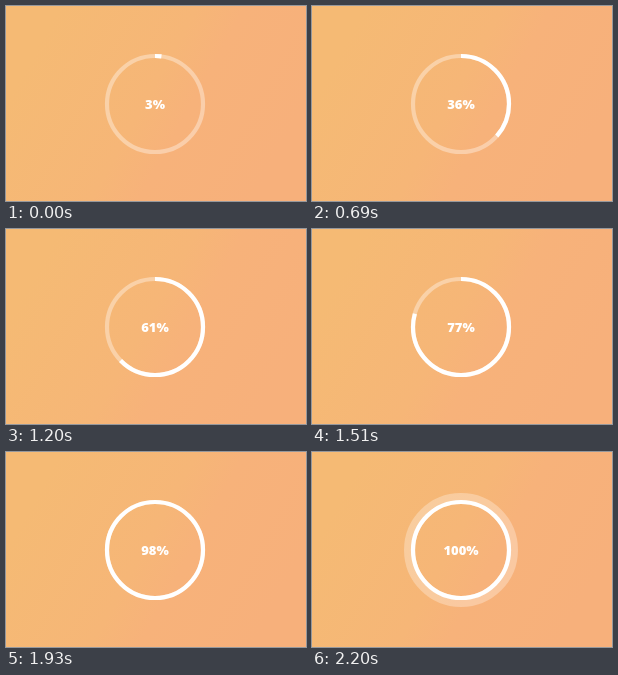
Animation, 300 px wide and 195 px high, one loop 2300 ms. Source, as an HTML page with a canvas:

```html
<!DOCTYPE html>
<html lang="en">
<head>
<meta charset="utf-8">
<title>Progress ring</title>
<style>
  html, body { margin: 0; width: 100%; height: 100%; overflow: hidden; }
  canvas { display: block; width: 300px; height: 195px; }
</style>
</head>
<body>
<canvas id="stage" width="300" height="195"></canvas>
<script>
const ctx = document.getElementById('stage').getContext('2d');
const LOOP = 2300;
const TICKS = [0, 140, 270, 410, 540, 690, 840, 960, 1080, 1200,
               1350, 1510, 1660, 1780, 1930, 2080, 2200];
const CX = 149, CY = 98, RADIUS = 48, WIDTH = 4.2;
const TOP = -Math.PI / 2, TURN = Math.PI * 2;

const background = ctx.createLinearGradient(35, 34, 265, 161);
background.addColorStop(0, '#f5ba74');
background.addColorStop(0.46, '#f6b677');
background.addColorStop(0.62, '#f7b27a');
background.addColorStop(1, '#f7b07b');

function percentAt(t) {
  const value = t < 1200 ? 2.5 + t * 0.0487 : 61 + (t - 1200) * 0.05;
  return Math.min(100, Math.round(value));
}

function ring(radius, width, alpha, part = 1) {
  ctx.beginPath();
  ctx.arc(CX, CY, radius, TOP, TOP + TURN * part);
  ctx.lineWidth = width;
  ctx.strokeStyle = `rgba(255, 255, 255, ${alpha})`;
  ctx.stroke();
}

function draw(t) {
  const percent = t >= 2080 ? 100 : percentAt(t);
  ctx.fillStyle = background;
  ctx.fillRect(0, 0, 300, 195);

  // The pulse spreads outward and fades once the ring is full.
  if (t >= 2080) {
    const k = (t - 2080) / 120;
    const spread = 4.5 + 2.5 * k;
    ring(50 + spread / 2, spread, 0.37 - 0.08 * k);
  }

  ring(RADIUS, WIDTH, 0.36);
  // The arc trails the counter at first, then runs ahead of it.
  ring(RADIUS, WIDTH, 1, Math.min(1, percent * 0.01045 - 0.01));

  ctx.font = '800 13px "Open Sans", sans-serif';
  ctx.textAlign = 'center';
  ctx.fillStyle = '#fff';
  ctx.fillText(percent + '%', CX, 103);
}

function frame() {
  const t = performance.now() % LOOP;
  draw(TICKS.filter(tick => tick <= t).pop());
  requestAnimationFrame(frame);
}
frame();
</script>
</body>
</html>
```
